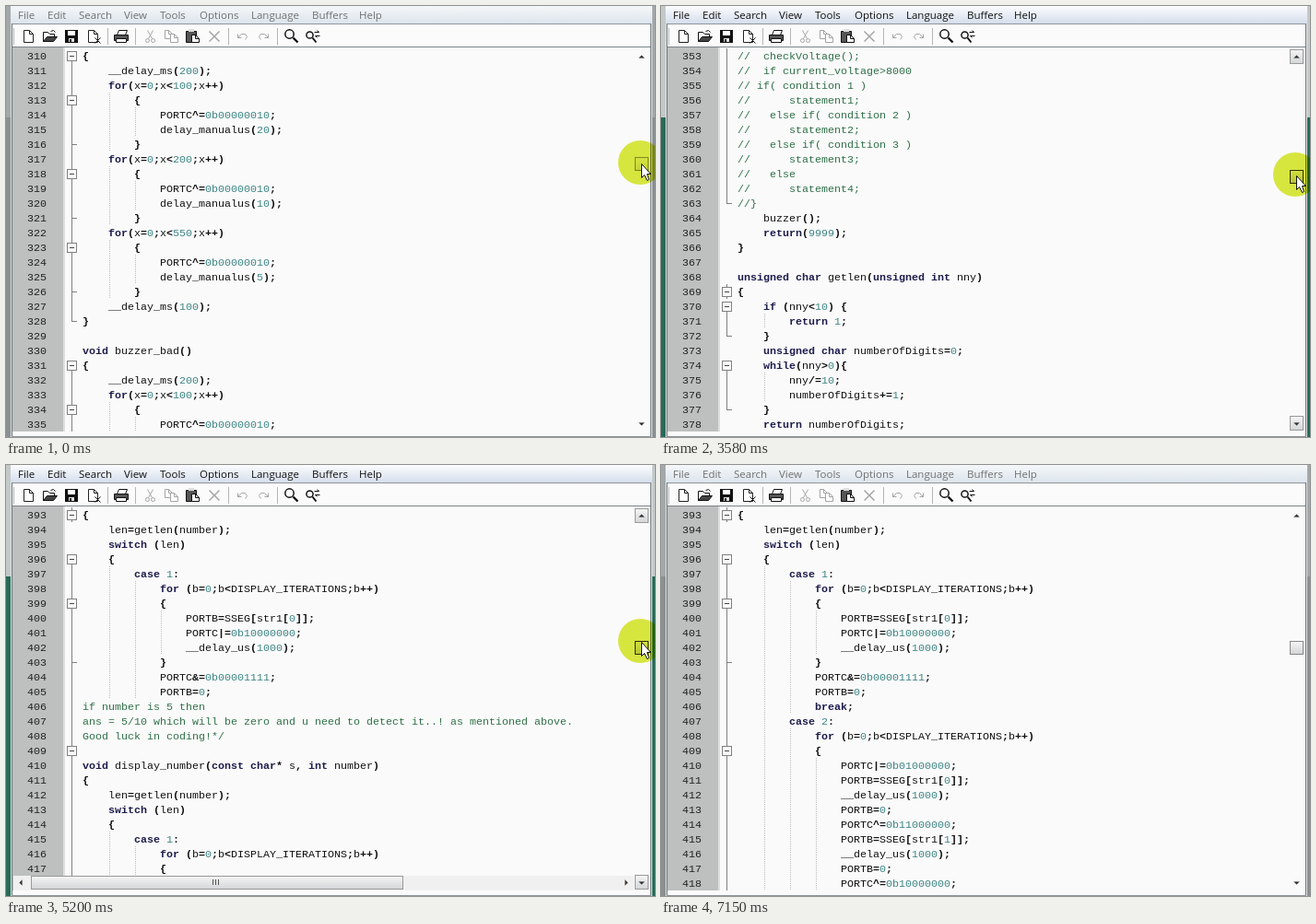
Write an HTML page with a canvas that moves like this. It is 704 by 468 pixels and loops after 7180 ms.

```html
<!DOCTYPE html>
<html lang="en">
<head>
<meta charset="utf-8">
<title>Code editor scrolling</title>
<style>
  html, body { margin: 0; width: 100%; height: 100%; overflow: hidden; background: #fafafa; }
  canvas { display: block; }
</style>
</head>
<body>
<canvas id="stage" width="704" height="468"></canvas>
<script>
const g = document.getElementById('stage').getContext('2d');
const LOOP = 7180, FIRST = 310, ROW = 16, CHAR = 7;
const MONO = '"Liberation Mono", monospace';

const buzz = (n, us) => `    for(x=0;x<${n};x++)
        {
            PORTC^=0b00000010;
            delay_manualus(${us});
        }
`;
const buzzer = `{
    __delay_ms(200);
${buzz(100, 20)}${buzz(200, 10)}${buzz(550, 5)}    __delay_ms(100);
}
`;
const code = (buzzer + `
void buzzer_bad()
${buzzer}
unsigned int checkState()
{
//  checkVoltage();
//  if current_voltage>8000
// if( condition 1 )
//      statement1;
//   else if( condition 2 )
//      statement2;
//   else if( condition 3 )
//      statement3;
//   else
//      statement4;
//}
    buzzer();
    return(9999);
}

unsigned char getlen(unsigned int nny)
{
    if (nny<10) {
        return 1;
    }
    unsigned char numberOfDigits=0;
    while(nny>0){
        nny/=10;
        numberOfDigits+=1;
    }
    return numberOfDigits;
}

/*  Divide number by multiples of 10 till quotient is 1. (if quotient is 0 when dividing
e.g. int ans = 0;
ans = 14294/10; loop = 1
ans = 14294/100; loop = 2
ans = 14294/1000; loop = 3
ans = 14294/10000; loop = 4
ans will be 1 now ( ans is int) Therefore number of digits is 5 ( i.e.loop + 1)
if number is 5 then
ans = 5/10 which will be zero and u need to detect it..! as mentioned above.
Good luck in coding!*/

void display_number(const char* s, int number)
{
    len=getlen(number);
    switch (len)
    {
        case 1:
            for (b=0;b<DISPLAY_ITERATIONS;b++)
            {
                PORTB=SSEG[str1[0]];
                PORTC|=0b10000000;
                __delay_us(1000);
            }
            PORTC&=0b00001111;
            PORTB=0;
            break;
        case 2:
            for (b=0;b<DISPLAY_ITERATIONS;b++)
            {
                PORTC|=0b01000000;
                PORTB=SSEG[str1[0]];
                __delay_us(1000);
                PORTB=0;
                PORTC^=0b11000000;
                PORTB=SSEG[str1[1]];
                __delay_us(1000);
                PORTB=0;
                PORTC^=0b10000000;`).split('\n');
const lineAt = n => code[n - FIRST] || '';
const KEYWORD = /^(void|for|if|else|return|unsigned|char|int|while|switch|case|const|break)$/;
const FOLDS = [[310, 328], [331, 349], [352, 363], [370, 372], [374, 377], [396, 999]];

// time, top line, thumb centre when it runs ahead of the text
const JUMPS = [
  [-999, 310], [115, 313], [2300, 319], [2480, 325], [2660, 331], [2900, 338],
  [3080, 344], [3260, 350], [3440, 353], [3650, 359], [3860, 366], [4070, 372],
  [4425, 390], [4640, 393], [4850, 375], [5135, 393], [6015, 375, 187], [6400, 393]
];
const POINTER = [[0, 170], [1300, 170], [2140, 171], [3580, 183], [4480, 188], [5200, 191], [6100, 190], [LOOP, 190]];

function lerpKeys(keys, t) {
  const i = Math.max(1, keys.findIndex(k => k[0] >= t));
  const [t0, a] = keys[i - 1], [t1, b] = keys[i];
  return a + (b - a) * (t - t0) / (t1 - t0);
}

function rect(c, x, y, w, h) { g.fillStyle = c; g.fillRect(x, y, w, h); }
function frame(c, x, y, w, h) { g.strokeStyle = c; g.lineWidth = 1; g.strokeRect(x + .5, y + .5, w, h); }
function poly(c, pts, fill, width = 1) {
  g.beginPath();
  for (let i = 0; i < pts.length; i += 2) g.lineTo(pts[i] + .5, pts[i + 1] + .5);
  if (fill) { g.closePath(); g.fillStyle = fill; g.fill(); }
  g.strokeStyle = c; g.lineWidth = width; g.stroke();
}
function ring(c, x, y, r, width = 1) {
  g.beginPath(); g.arc(x, y, r, 0, 7); g.strokeStyle = c; g.lineWidth = width; g.stroke();
}
function shade(x, y, w, h, a, b) {
  const s = g.createLinearGradient(0, y, 0, y + h);
  s.addColorStop(0, a); s.addColorStop(1, b);
  rect(s, x, y, w, h);
}
function arrow(x, y, dx, dy) {
  poly('#333', [x + 2 * dx, y + 2 * dy, x - 3 * dy - dx, y - 3 * dx - dy, x + 3 * dy - dx, y + 3 * dx - dy], '#333', .2);
}

function drawMenu(active) {
  shade(5, 0, 699, 19, active ? '#fbfcfe' : '#f5f8fa', active ? '#d5deec' : '#dce4ec');
  g.font = '11.5px "Open Sans", sans-serif';
  g.fillStyle = active ? '#111' : '#707070';
  const items = { File: 13, Edit: 45, Search: 79, View: 128, Tools: 167, Options: 210, Language: 266, Buffers: 332, Help: 383 };
  for (const name in items) g.fillText(name, items[name], 14);
}

function sheet(x, y, c = '#222', w = 10, h = 13) {
  poly(c, [x, y, x + w - 4, y, x + w, y + 4, x + w, y + h, x, y + h, x, y], '#fff');
  poly(c, [x + w - 4, y, x + w - 4, y + 4, x + w, y + 4]);
}

function drawToolbar() {
  const ink = '#111', dim = '#a4a4a4';
  rect('#fbfbfb', 6, 19, 694, 26);
  rect('#8f959c', 6, 19, 694, 1);
  rect('#7c8488', 6, 44, 694, 1);
  for (const x of [8, 110, 140, 241, 294]) rect('#b5b5b5', x, 24, 1, 18);
  sheet(19, 26);
  poly(ink, [40, 38, 40, 28, 45, 28, 47, 30, 52, 30, 52, 33], '#fff');
  poly(ink, [40, 38, 44, 33, 55, 33, 51, 38, 40, 38], '#444');
  poly(ink, [48, 27, 51, 26, 53, 28]);
  rect('#111', 64, 26, 14, 14); rect('#fff', 67, 27, 8, 5); rect('#ddd', 68, 35, 6, 4); rect('#111', 69, 36, 2, 3);
  sheet(89, 26);
  poly(ink, [96, 34, 102, 40]); poly(ink, [102, 34, 96, 40]);
  poly(ink, [120, 31, 122, 26, 131, 26, 129, 31], '#fff');
  poly(ink, [117, 31, 132, 31, 132, 37, 117, 37, 117, 31], '#555');
  poly(ink, [119, 35, 130, 35, 130, 39, 119, 39, 119, 35], '#fff');
  poly(dim, [153, 26, 158, 35]); poly(dim, [159, 26, 154, 35]);
  ring(dim, 153.5, 37.5, 2); ring(dim, 159.5, 37.5, 2);
  sheet(172, 26, dim, 8, 9); sheet(178, 30, dim, 8, 9);
  poly(ink, [195, 27, 206, 27, 206, 39, 195, 39, 195, 27], '#555');
  rect('#ddd', 198, 25, 6, 3); sheet(201, 31, ink, 8, 8);
  poly(dim, [220, 27, 231, 38], null, 1.5); poly(dim, [231, 27, 220, 38], null, 1.5);
  for (const [x, d] of [[251, 1], [284, -1]]) {
    poly(dim, [x, 30, x, 34, x + 4 * d, 34]);
    poly(dim, [x, 34, x + 4 * d, 30, x + 8 * d, 30, x + 10 * d, 33, x + 8 * d, 36]);
  }
  ring(ink, 307.5, 30.5, 4.7, 1.5); poly(ink, [311, 34, 316, 39], null, 2.4);
  ring(ink, 329.5, 31.5, 3.6, 1.5); poly(ink, [332, 34, 336, 39], null, 2);
  poly(ink, [334, 28, 339, 28, 337, 26]); poly(ink, [340, 32, 335, 32, 337, 34]);
}

function drawLine(n, y) {
  const text = lineAt(n);
  if (!text) return;
  const comment = text.startsWith('//') || (n > 380 && n < 391);
  const indent = text.search(/\S/);
  for (let col = 4; col < indent; col += 4)
    for (let d = -8; d < 8; d += 2) rect('#bcbcbc', 84 + col * CHAR, y + d, 1, 1);
  for (const m of text.matchAll(/\w+|\S/g)) {
    const word = m[0];
    const bold = !comment && (KEYWORD.test(word) || /\W/.test(word));
    g.font = (bold ? 'bold ' : '') + '11.667px ' + MONO;
    g.fillStyle = comment ? '#2f7048' : /^\d/.test(word) ? '#3c8484' : KEYWORD.test(word) ? '#1c1c4c' : '#111';
    g.fillText(word, 83 + m.index * CHAR, y + 4);
  }
}

function drawMargin(n, y) {
  g.font = '11.667px ' + MONO;
  g.fillStyle = '#222';
  g.fillText(n, 23, y + 4);
  const text = lineAt(n), c = '#808080';
  const fold = FOLDS.find(([a, b]) => n >= a && n <= b);
  const open = /\{$|^\/\*/.test(text);
  if (fold) {
    const from = n === fold[0] ? y : y - 8;
    rect(c, 71, from, 1, (n === fold[1] ? y : y + 8) - from);
    if (n === fold[1] || text.trim() === '}') rect(c, 71, y, 6, 1);
  }
  if (open) {
    if (!fold) rect(c, 71, y - 8, 1, 16);
    rect('#fafafa', 66, y - 5, 11, 11);
    frame(c, 66, y - 5, 10, 10);
    rect('#444', 69, y, 5, 1);
  }
}

function drawEditor(top, old, done, bottom) {
  rect('#fafafa', 6, 45, 694, 423);
  rect('#bdc0be', 7, 45, 55, 417);
  rect('#dedede', 62, 45, 2, 417);
  g.save();
  g.beginPath(); g.rect(6, 46, 675, bottom - 46); g.clip();
  for (let r = 0; r < 26; r++) {
    const y = 54 + r * ROW;
    drawMargin(top + r, y);
    drawLine((r < done ? top : old) + r, y);
  }
  g.restore();
}

function button(x, y, w, h, c = '#999') {
  shade(x, y, w, h, '#f6f6f6', '#d2d4d6');
  frame(c, x, y, w - 1, h - 1);
}

function drawScrollbars(t, active, wide, thumb) {
  const down = t > 5700 && wide ? 436 : 453;
  if (active) { button(682, 47, 15, 16); button(682, down - 8, 15, 16); }
  arrow(689, 55, 0, -1);
  arrow(689, down, 0, 1);
  if (wide) {
    rect('#f0f0f0', 8, 446, 673, 16);
    arrow(16, 453, -1, 0);
    arrow(672, 453, 1, 0);
    button(27, 446, 404, 15);
    for (let i = 0; i < 3; i++) rect('#555', 224 + i * 3, 450, 1, 6);
  }
  g.globalAlpha = t < 130 ? .5 : 1;
  button(682, thumb - 7, 15, 15, t < 6800 ? '#333' : '#888');
  g.globalAlpha = 1;
}

function drawEdges(active) {
  for (const x of [0, 701]) {
    rect(active ? '#c3c8c8' : '#a3a8aa', x, 0, x ? 3 : 5, 121);
    rect(active ? '#276b58' : '#8b9092', x, 121, x ? 3 : 5, 347);
  }
  rect('#e4e6e8', 5, 19, 1, 449);
  rect('#e4e6e8', 700, 19, 1, 449);
  rect('#6b7577', 6, 19, 1, 449);
  rect('#6b7577', 699, 19, 1, 449);
  rect('#8f959c', 6, 467, 694, 1);
}

function drawPointer(x, y) {
  g.globalCompositeOperation = 'multiply';
  g.beginPath(); g.arc(x, y, 24, 0, 7); g.fillStyle = '#dcea40'; g.fill();
  g.globalCompositeOperation = 'source-over';
  const shape = [0, 0, 0, 15, 3, 12, 6, 18, 8, 17, 6, 11, 10, 11, 0, 0];
  poly('#111', shape.map((v, i) => v + (i % 2 ? y + 1 : x + 1)), '#fff');
}

function draw(ms) {
  const now = ms % LOOP;
  const t = now < 130 ? 0 : 130 + Math.floor((now - 130) / 30) * 30;
  const i = JUMPS.findLastIndex(j => t >= j[0]);
  const [start, top, ahead] = JUMPS[i];
  const old = i ? JUMPS[i - 1][1] : top;
  const done = Math.floor((t - start) / 5);
  const wide = t >= 3650 && t < 6900;
  const thumb = ahead || Math.round(172 + (top - 313) * .325);
  const active = t >= 1300 && t < 7090;

  drawEditor(top, old, done, wide ? 446 : 462);
  drawScrollbars(t, active, wide, thumb);
  drawToolbar();
  drawMenu(active);
  drawEdges(t >= 1300 && t < 6900);
  if (t < 7000) drawPointer(688 + Math.max(0, t - 6750) * .2, Math.round(lerpKeys(POINTER, t)));
}

const begin = performance.now();
function tick() {
  draw(performance.now() - begin);
  requestAnimationFrame(tick);
}
tick();
</script>
</body>
</html>
```
